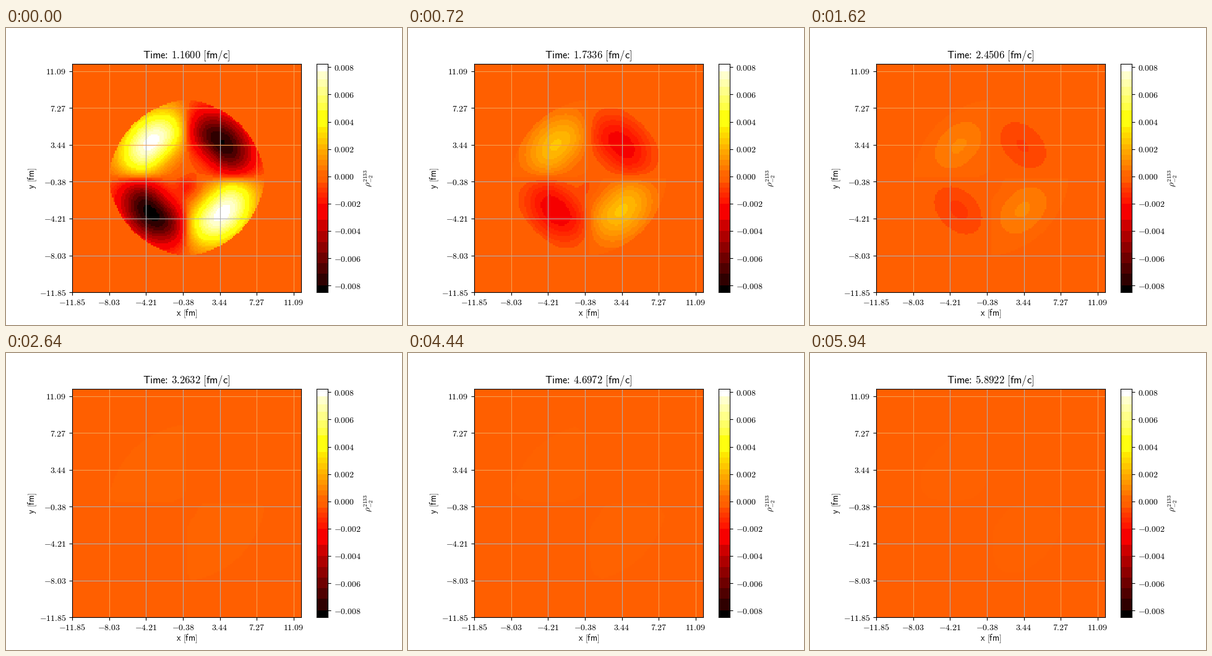
Animation, 640 px wide and 480 px high, one loop 6 s. Source, as a matplotlib script:

```python
import numpy as np
import matplotlib as mpl
import matplotlib.pyplot as plt
from matplotlib.animation import FuncAnimation

mpl.rcParams["mathtext.fontset"] = "cm"

W, H, DPI = 640, 480, 100
FRAMES, INTERVAL = 100, 60
T0, DT = 1.16, 0.0478
LIM = 11.854
CELLS = 155
VMIN, VMAX = -8.5, 8.263  # in units of 1e-3

# Colour band limits, finer around zero.
EDGES = np.array([
    VMIN, -7.99, -7.13, -6.36, -5.59, -4.82, -4.0, -3.18, -2.0, -1.55, -1.19,
    -0.82, -0.457, 0.01, 0.457, 0.82, 1.2, 1.58, 1.97, 2.37, 2.78, 3.2, 3.6,
    4.85, 5.4, 5.95, 6.55, 7.1, 7.7, VMAX])
FAINT = 13  # first band above zero

GREY, PALE = "#b0b0b0", "#f5a050"


def band_colors():
    mids = (EDGES[:-1] + EDGES[1:]) / 2
    rgb = plt.get_cmap("hot")((mids - VMIN) / (VMAX - VMIN))[:, :3]
    rgb[0], rgb[-1] = 0, 1
    rgb[FAINT - 1] = np.array([255, 95, 0]) / 255
    rgb[FAINT] = np.array([255, 102, 0]) / 255
    return rgb


COLORS = band_colors()

# Grid coordinates in screen pixels around the centre.
axis = (np.arange(CELLS) - CELLS // 2) * 369.6 / CELLS
X, Y = np.meshgrid(axis, axis)
R = np.hypot(X, Y)
SIN2 = np.sin(2 * np.arctan2(Y, X))
INSIDE = R < 126 - 4.5 * np.abs(SIN2)
AMP = np.where(Y > 0, np.where(X > 0, 8.05, 8.2), np.where(X > 0, 8.26, 8.5))
LOBES = -AMP * np.sign(SIN2) * np.abs(SIN2) ** 0.75
SPOT = -1.7 * np.exp(-((X - 2) ** 2 + (Y + 15) ** 2) / (2 * 12.5 ** 2))


def field(t):
    peak = 72 + 9 * np.exp(-(t - T0) / 0.45)
    sigma = np.where(R < peak, 25, 28)
    ring = np.exp(-((R - peak) / sigma) ** 2 / 2)
    return np.where(INSIDE, (LOBES * ring + SPOT) * (T0 / t) ** 3, 0)


def picture(t):
    band = np.digitize(field(t), EDGES[1:-1])
    colors = COLORS.copy()
    green = 97 + 5 * min(1, np.exp(-(t - 2.45) / 1.6))
    colors[FAINT, 1] = green / 255
    return colors[band]


def sans(text):
    """Sans-serif math text with plain word spacing."""
    text = text.replace(":", r"\hspace{-0.2}:\hspace{-0.2}")
    words = [r"\mathsf{%s}" % w for w in text.split()]
    return "$" + r"\hspace{0.38}".join(words) + "$"


def title_at(t):
    return sans(f"Time: {t:.4f} [fm/c]")


def pixel_axes(x, y, w, h):
    return fig.add_axes([x / W, 1 - (y + h) / H, w / W, h / H])


def pixel_text(x, y, text, **kw):
    fig.text(x / W, 1 - y / H, text, fontsize=10, ha="center", **kw)


fig = plt.figure(figsize=(W / DPI, H / DPI), dpi=DPI, facecolor="white")

ax = pixel_axes(107.2, 57.6, 369.6, 369.6)
image = ax.imshow(picture(T0), origin="lower", interpolation="nearest",
                  extent=[-LIM, LIM, -LIM, LIM], aspect="auto")
title = ax.set_title(title_at(T0), fontsize=12)

ticks = -LIM + 25 * 2 * LIM / CELLS * np.arange(7)
labels = [f"${v:.2f}$" for v in ticks]
ax.set_xticks(ticks, labels)
ax.set_yticks(ticks, labels)
for i, v in enumerate(ticks):
    if i:
        ax.axvline(v, color=GREY if 2 <= i <= 4 else PALE, lw=0.8, zorder=1.5)
for i, v in enumerate(ticks):
    if i:
        ax.axhline(v, color=GREY if i <= 3 else PALE, lw=0.8, zorder=1.6)
ax.set_xlim(-LIM, LIM)
ax.set_ylim(-LIM, LIM)

pixel_text(292, 465, sans("x [fm]"), va="baseline")
pixel_text(46, 242.4, sans("y [fm]"), va="baseline", rotation=90,
           rotation_mode="anchor")

cax = pixel_axes(501.6, 57.6, 18.48, 369.6)
for low, high, color in zip(EDGES[:-1], EDGES[1:], COLORS):
    cax.axhspan(low, high, color=color, lw=0)
cax.set_xlim(0, 1)
cax.set_ylim(VMIN, VMAX)
cax.set_xticks([])
cax.yaxis.tick_right()
marks = np.arange(-8, 9, 2)
cax.set_yticks(marks, [f"${m / 1000:.3f}$" for m in marks])
pixel_text(586, 242, r"$\rho^{2133}_{-2}$", va="center", rotation=90)


def update(n):
    t = T0 + n * DT
    image.set_data(picture(t))
    title.set_text(title_at(t))
    return image, title


anim = FuncAnimation(fig, update, frames=FRAMES, interval=INTERVAL,
                     repeat=True, repeat_delay=0)
plt.show()
```
